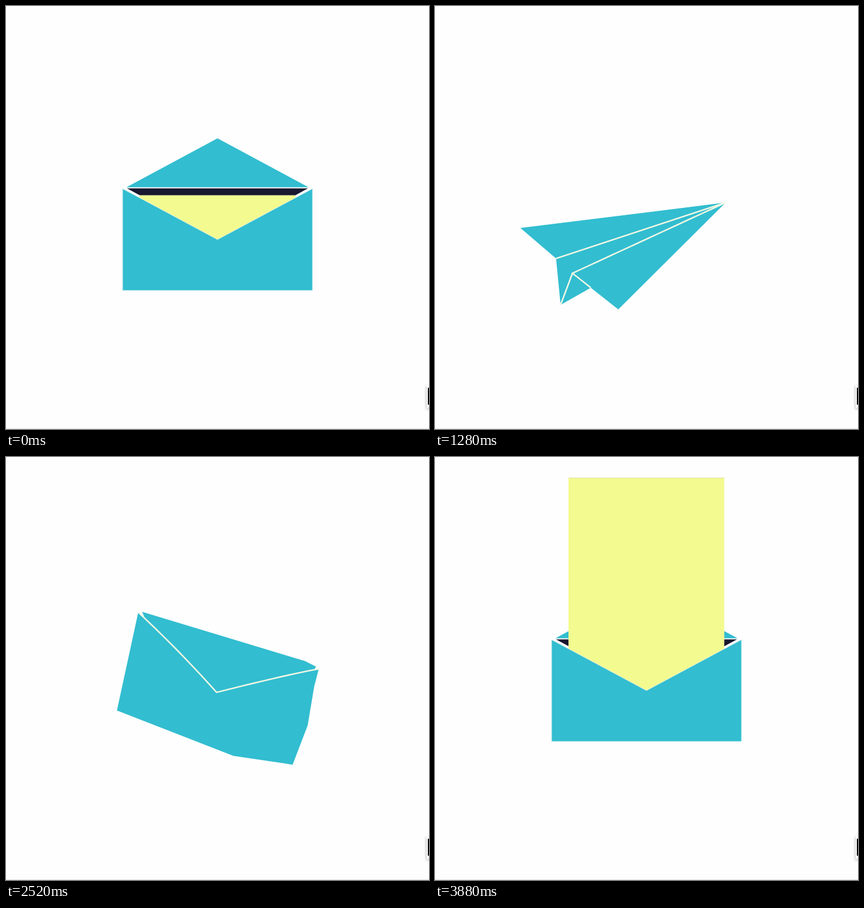
An HTML page with a canvas for the animation above (3.92 s loop, 748x748 px).

```html
<!DOCTYPE html>
<html lang="en">
<head>
<meta charset="utf-8">
<title>Paper mail</title>
<style>
html, body { margin: 0; width: 100%; height: 100%; overflow: hidden; background: #fefefe; }
canvas { display: block; }
</style>
</head>
<body>
<canvas id="stage" width="748" height="748"></canvas>
<script>
const ctx = document.getElementById('stage').getContext('2d');
const LOOP = 3920, STEP = 40;
const TEAL = '#32bdd0', DARK = '#18172f', PAPER = '#f3fa90', EDGE = '#d3eff0', CREASE = '#eef7e4';
const CX = 374, CY = 413, W = 168, H = 90;
const TILT = 38.5 * Math.PI / 180;

const clamp = v => Math.max(0, Math.min(1, v));
const span = (t, a, b) => clamp((t - a) / (b - a));
const smooth = k => k * k * (3 - 2 * k);
const mix = (a, b, k) => a + (b - a) * k;
const between = (p, q, k) => [mix(p[0], q[0], k), mix(p[1], q[1], k)];

// Corners of the paper plane
const nose = [549, 321], tail = [186, 366], fold = [249, 420];
const keel = [257, 502], inner = [278, 446], wing = [359, 510];
const strut = between(inner, wing, 0.4);

// A point of the envelope, how far it warps while tilting, its place in the plane
const point = (x, y, dx, dy, plane) => ({ x, y, dx, dy, plane });
const left = point(-W, -H, -17, -7, nose);
const right = point(W, -H, -21, 6, strut);
const tip = point(0, 0, -2, 10, inner);
const leftBend = point(-W / 2, -H / 2, -3, -10, between(nose, inner, 0.5));
const rightBend = point(W * 0.75, -H * 0.75, -19, -1, between(inner, wing, 0.3));
const OUTLINE = [
  left,
  point(-W, H, 22, -15, between(nose, tail, 0.33)),
  point(58, H, 6, 36, tail),
  point(158, H, -13, -3, fold),
  point(W, H, -9, -7, keel),
  point(W, 15, 7, -5, strut),
  point(W, -57, -18, 2, strut),
  right
];
const LID = [
  point(-W + 7, -H - 3, -19, -6, nose),
  point(141, -H - 3, -21, -4, between(nose, wing, 0.5)),
  point(W - 7, -H - 3, -18, 7, wing)
];

// tilt: closed to tilted envelope; flight: tilted envelope to plane
function place(p, tilt, flight) {
  const warp = tilt ** 1.25, a = TILT * tilt, c = Math.cos(a), s = Math.sin(a);
  const x = p.x + p.dx * warp, y = p.y + p.dy * warp;
  return between([CX + x * c - y * s, CY + x * s + y * c], p.plane, flight);
}

function curve(a, b, c, steps = 12) {
  return Array.from({ length: steps + 1 }, (_, i) =>
    between(between(a, b, i / steps), between(b, c, i / steps), i / steps));
}

function trace(points) {
  ctx.beginPath();
  points.forEach(([x, y]) => ctx.lineTo(x, y));
}

function fill(points, color) {
  trace(points);
  ctx.closePath();
  ctx.fillStyle = color;
  ctx.fill();
}

function line(points, color, width) {
  trace(points);
  ctx.strokeStyle = color;
  ctx.lineWidth = width;
  ctx.stroke();
}

function drawFolded(tilt, flight, dx, dy) {
  const at = p => place(p, tilt, flight);
  const outline = OUTLINE.map(at);
  const seam = [
    ...curve(at(right), at(rightBend), at(tip)),
    ...curve(at(tip), at(leftBend), at(left))
  ];
  ctx.save();
  ctx.translate(dx, dy);
  fill([...outline, ...seam], TEAL);
  fill([...LID.map(at), ...seam.slice(1, -1)], TEAL);
  line(seam, CREASE, 2.6);
  ctx.globalAlpha = flight * flight;
  line([outline[3], outline[0]], CREASE, 2.6);
  line([outline[4], at(tip)], CREASE, 2.6);
  ctx.restore();
}

function drawOpen(open, top) {
  const lid = [[213, 320.5], [CX, mix(409, 234, open)], [535, 320.5]];
  const down = open < 0.5;
  if (!down) fill(lid, TEAL);
  fill([[214, 322.5], [534, 322.5], [CX, 409.5]], DARK);
  const bottom = Math.min(top + 380, 450);
  if (bottom > top) {
    fill([[236, top], [511.5, top], [511.5, bottom], [236, bottom]], PAPER);
    line([[236, top], [511.5, top]], '#d9dfa0', 1);
  }
  const l = CX - W, r = CX + W, base = CY + H, rim = CY - H;
  const body = [[l, rim], [l, base], [r, base], [r, rim], [CX, CY]];
  fill(body, TEAL);
  line([...body, body[0], body[1]], EDGE, 1);
  if (down) fill(lid, TEAL);
}

function drawPointer() {
  ctx.save();
  ctx.shadowColor = 'rgba(0,0,0,.4)';
  ctx.shadowBlur = 5;
  ctx.shadowOffsetY = 2;
  fill([[744, 669], [748, 672], [748, 709], [744, 712]], '#fff');
  ctx.restore();
  ctx.fillStyle = '#000';
  ctx.fillRect(746, 675, 2, 30);
}

function drawMail(t) {
  if (t < 160) return drawOpen(1 - t / 160, 335 + t * 1.9);
  if (t >= 2920) {
    const fall = span(t, 3313, 3880);
    return drawOpen(smooth(span(t, 2920, 3240)), 417 * fall * fall - 380);
  }
  if (t < 1680) {
    const tilt = 1.104 * span(t, 400, 960) ** 1.34;
    const k = span(t, 1140, 1680);
    const go = 610 * k * k * (2.5 * k - 1.5);
    return drawFolded(tilt, smooth(span(t, 960, 1140)), go, -0.76 * go);
  }
  if (t < 1980) return;
  const away = 600 * (1 - span(t, 1960, 2240)) ** 3;
  const tilt = 1.104 * (1 - span(t, 2360, 2680)) ** 1.35;
  drawFolded(tilt, 1 - smooth(span(t, 2240, 2360)), -away, 0.76 * away);
}

function frame(now) {
  const t = Math.floor(now % LOOP / STEP) * STEP;
  ctx.fillStyle = '#fefefe';
  ctx.fillRect(0, 0, 748, 748);
  drawMail(t);
  ctx.fillStyle = '#dedede';
  ctx.fillRect(0, 747, 748, 1);
  drawPointer();
}

const start = performance.now();
(function tick() {
  frame(performance.now() - start);
  requestAnimationFrame(tick);
})();
</script>
</body>
</html>
```
